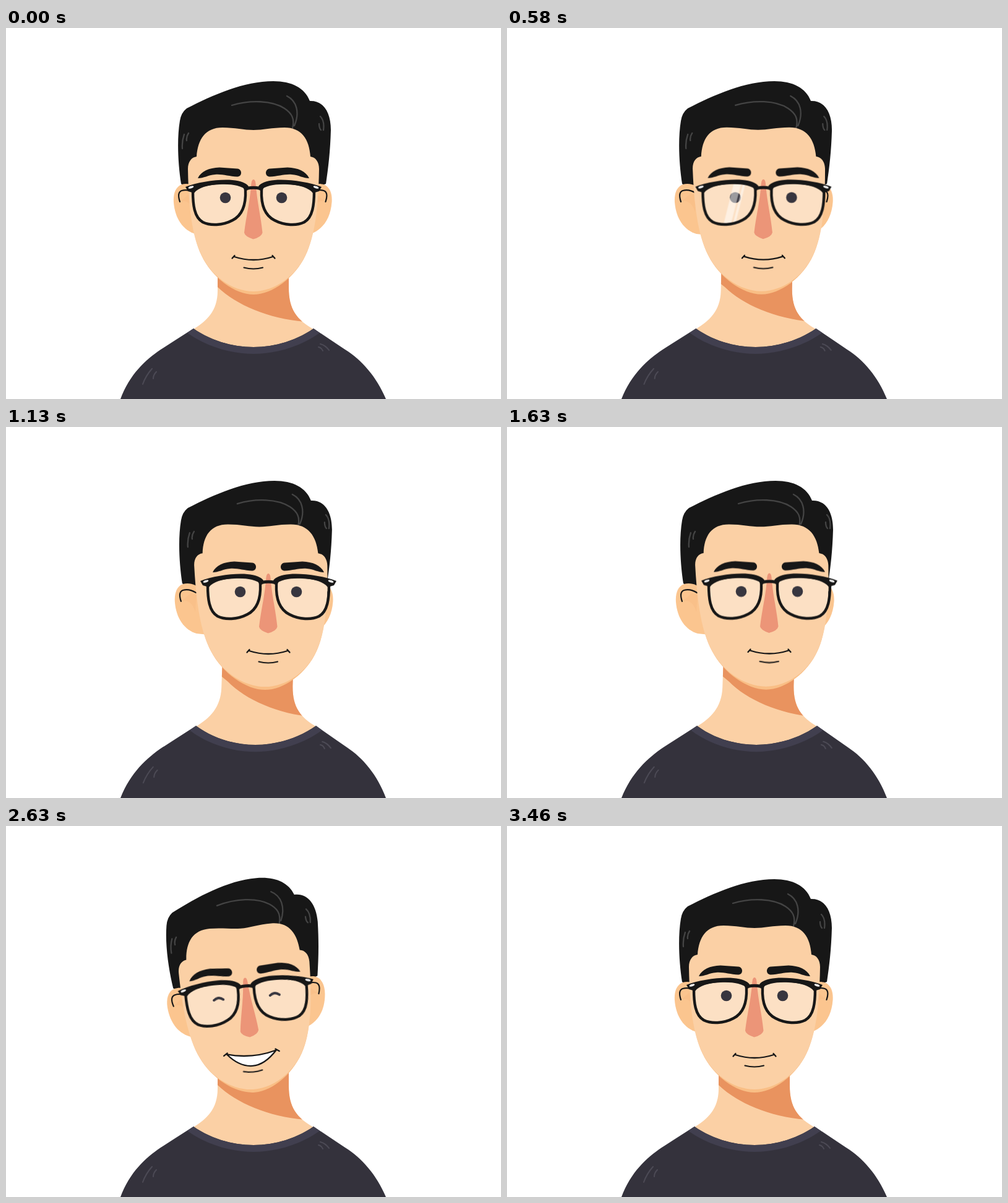
Animation, 800 px wide and 600 px high, one loop 3.5 s. Source, as an HTML page without scripts:

```html
<!DOCTYPE html>
<html lang="en">
<head>
<meta charset="utf-8">
<title>Man with glasses</title>
<style>
@property --turn { syntax: "<number>"; inherits: true; initial-value: 0; }
@property --lift { syntax: "<number>"; inherits: true; initial-value: 0; }
@property --tilt { syntax: "<number>"; inherits: true; initial-value: 0; }

html, body { margin: 0; width: 100%; height: 100%; overflow: hidden; background: #fff; }

svg {
  display: block; width: 100vw; height: 100vh;
  --loop: 3.5s cubic-bezier(.33, 0, .4, 1) infinite;
  animation: turn var(--loop), lift var(--loop), tilt var(--loop);
}

/* Pose values that every layer follows by its own amount */
@keyframes turn { 0%, 2.9% { --turn: 0 } 33%, 47.7% { --turn: 1 } 67.5%, 100% { --turn: 0 } }
@keyframes lift { 0%, 14% { --lift: 0 } 38%, 47.7% { --lift: 1 } 68.5%, 100% { --lift: 0 } }
@keyframes tilt { 0%, 47.7% { --tilt: 0 } 71.5%, 78.6% { --tilt: 1 } 94%, 100% { --tilt: 0 } }

.body {
  transform-origin: 400px 600px;
  transform: skewX(calc(var(--turn) * -2deg)) scaleY(calc(1 + var(--lift) * .025));
}
.shadow { transform: translate(calc(var(--turn) * 10px), calc(var(--lift) * -3px)); }
.head { transform-origin: 398px 403px; transform: rotate(calc(var(--tilt) * -5deg)); }
.back { transform: translate(calc(var(--lift) * 2px), calc(var(--lift) * 1px)); }
.shine { transform: translate(calc(var(--turn) * 7px), calc(var(--lift) * -2px)); }
.face {
  transform-origin: 400px 250px;
  transform: translate(calc(var(--turn) * 12.5px), calc(var(--lift) * -4.5px))
    skewX(calc(var(--turn) * 2deg))
    scale(calc(1 + var(--turn) * .015), calc(1 - var(--lift) * .01));
}
.features { transform: translate(calc(var(--turn) * 24px), calc(var(--lift) * -8.5px)); }

.mouth { animation: grin var(--loop); }
@keyframes grin {
  0%, 55.5%, 92%, 100% {
    d: path("M369 370Q400 380 431 370Q415.5 375 400 375Q384.5 375 369 370ZM365.5 372.5L369.5 368M434.500 372.5L430.5 368");
  }
  72%, 79% {
    d: path("M360 366Q400 377 440 366Q420 388 400 388Q379 388 360 366ZM355 368L361 364M445 368L439 364");
  }
}
.lip { animation: drop var(--loop); }
@keyframes drop { 0%, 55.5%, 92%, 100% { transform: none } 72%, 79% { transform: translateY(8.5px) } }

.open { transform-origin: 400px 274.5px; animation: shut 3.5s linear infinite; }
@keyframes shut {
  0%, 51%, 86.5%, 100% { transform: none; opacity: 1 }
  53.5%, 84.1% { transform: scaleY(.25); opacity: 1 }
  53.6%, 84% { transform: scaleY(.25); opacity: 0 }
}
.closed { animation: squint 3.5s step-end infinite; }
@keyframes squint { 0%, 84.05% { opacity: 0 } 53.55% { opacity: 1 } }

.glint { animation: sweep 3.5s linear infinite; }
@keyframes sweep {
  0%, 13.4% { transform: translateX(-88px) }
  23%, 100% { transform: translateX(172px) }
}

.line { fill: none; stroke-linecap: round; stroke-linejoin: round; }
.ink { stroke: #171717; }
</style>
</head>
<body>
<svg viewBox="0 0 800 600" preserveAspectRatio="none">
  <defs>
    <path id="neck" d="M342 365V425C342 458 324 474 303 487C340 534 460 534 497 487C470 472 457 455 457 420V365Z"/>
    <path id="lens" d="M302 264C303 256 330 251 350 250C372 250 387 253 387 262C388 285 382 303 366 311C350 319.5 330 320 318 314C304 306 302 285 302 264Z"/>
    <clipPath id="neckClip"><use href="#neck"/></clipPath>
    <clipPath id="lensClip">
      <use href="#lens"/>
      <use href="#lens" transform="matrix(-1 0 0 1 800 0)"/>
    </clipPath>

    <g id="ear">
      <path fill="#fbc58f" d="M320 270C310 254 296 250 284 253C274 257 270 268 271 282C273 308 286 327 306 333L325 335Z"/>
      <path fill="#f9bd85" d="M283 280C293 278 301 286 304 298L306 270L296 268Z" opacity=".6"/>
      <path class="line ink" stroke-width="2.2" d="M281 281Q276 266 284 263Q294 260 305 267"/>
    </g>

    <g id="side">
      <path fill="#171717" d="M310 243C315 232 328 226 345 225.500L374 227.500C382 228.500 382 240 374 240.500C360 240 350 236 338 237C326 238 320 243 310 243Z"/>
      <use href="#lens" fill="#fff" fill-opacity=".35"/>
    </g>

    <g id="rim">
      <use href="#lens" class="line ink" stroke-width="4.4"/>
      <path fill="#171717" d="M290 257C310 249 345 244 366 246C379 247 389 251 392 256L390 263C380 254 362 252 345 253C325 254 311 258 304 267L294 264Z"/>
      <ellipse cx="299" cy="257.500" rx="4.500" ry="1.800" fill="#eee" transform="rotate(-18 299 257.500)"/>
    </g>
  </defs>

  <g class="body">
    <use href="#neck" fill="#fbd0a5"/>
    <g clip-path="url(#neckClip)">
      <path class="shadow" fill="#e9935f" d="M310 360V394L342 419C372 448 425 470 482 475L510 476V360Z"/>
    </g>
    <path fill="#34323c" d="M185 600C200 560 225 537 250 520L303 486C330 505 365 516 400 516C435 516 470 505 497 486L548 520C575 537 599 564 614 600Z"/>
    <path fill="#413f4f" d="M303 486C330 505 365 516 400 516C435 516 470 505 497 486L507 493C475 516 435 527 400 527C365 527 325 516 293 493Z"/>
    <path class="line" stroke="#4c4a55" stroke-width="2" d="M236 551Q226 562 221 576M243 556Q238 561 238 567M508 511Q516 513 522 521M505 516Q510 517 512 522"/>
  </g>

  <g class="head">
    <g class="back">
      <path fill="#171717" d="M283 252C278 220 276 180 281 150Q283 137 292 130C335 108 385 86 432 86C462 86 483 97 491 118C512 117 525 135 525 165C524 200 521 225 517 252L490 262H300Z"/>
      <path class="line shine" stroke="#444" stroke-width="2.300" d="M365 125C395 116 430 117 450 130C462 138 467 147 463 162M454 110C470 118 475 137 466 158M288 172Q284 183 285 195M295 170Q291 176 292 182M508 143Q515 150 513 165M506 155Q506 162 509 165"/>
      <use href="#ear"/>
      <use href="#ear" transform="matrix(-1 0 0 1 797.500 0)"/>
    </g>

    <g class="face">
      <path fill="#f9be85" d="M299 300C303 330 308 352 316 368C333 404 370 431 400 431C430 431 467 404 484 368C492 352 497 330 501 300Z"/>
      <path fill="#fbd0a5" d="M400 165C385 165 370 161 350 161C322 161 310 180 308 208C300 209 294 216 294 228C295 285 300 335 315 365C330 400 365 426 400 426C435 426 470 400 485 365C500 335 505 285 506 228C506 216 500 209 492 208C490 180 478 161 450 161C430 161 415 165 400 165Z"/>
    </g>

    <g class="features">
      <path fill="#ec9578" d="M400 245C397 245 396.500 250 396 256C394 282 388 305 385 331Q386 337 399.500 341.500Q413 338 414.500 331C412 305 406 282 404 256C403.500 250 403 245 400 245Z"/>
      <path class="mouth ink" fill="#fff" stroke-width="2.300" stroke-linecap="round" stroke-linejoin="round" d="M369 370Q400 380 431 370Q415.500 375 400 375Q384.500 375 369 370ZM365.500 372.500L369.500 368M434.500 372.500L430.500 368"/>
      <path class="lip line ink" stroke-width="2.200" d="M384.500 387.500Q400 391.500 415 387.500"/>
      <use href="#side"/>
      <use href="#side" transform="matrix(-1 0 0 1 800 0)"/>
      <g class="open" fill="#38363f">
        <circle cx="354.500" cy="274.500" r="8.800"/>
        <circle cx="445.500" cy="274.500" r="8.800"/>
      </g>
      <path class="line closed" stroke="#38363f" stroke-width="4" d="M347 277Q354.500 271 362 277M438 277Q445.500 271 453 277"/>
      <g clip-path="url(#lensClip)">
        <path class="glint" fill="#fff" fill-opacity=".5" d="M355 245H367L347 325H335ZM370 245H374L354 325H350Z"/>
      </g>
      <use href="#rim"/>
      <use href="#rim" transform="matrix(-1 0 0 1 800 0)"/>
      <path class="line ink" stroke-width="5" d="M389 259.500Q400 257 411 259.500"/>
    </g>
  </g>
</svg>
</body>
</html>
```
